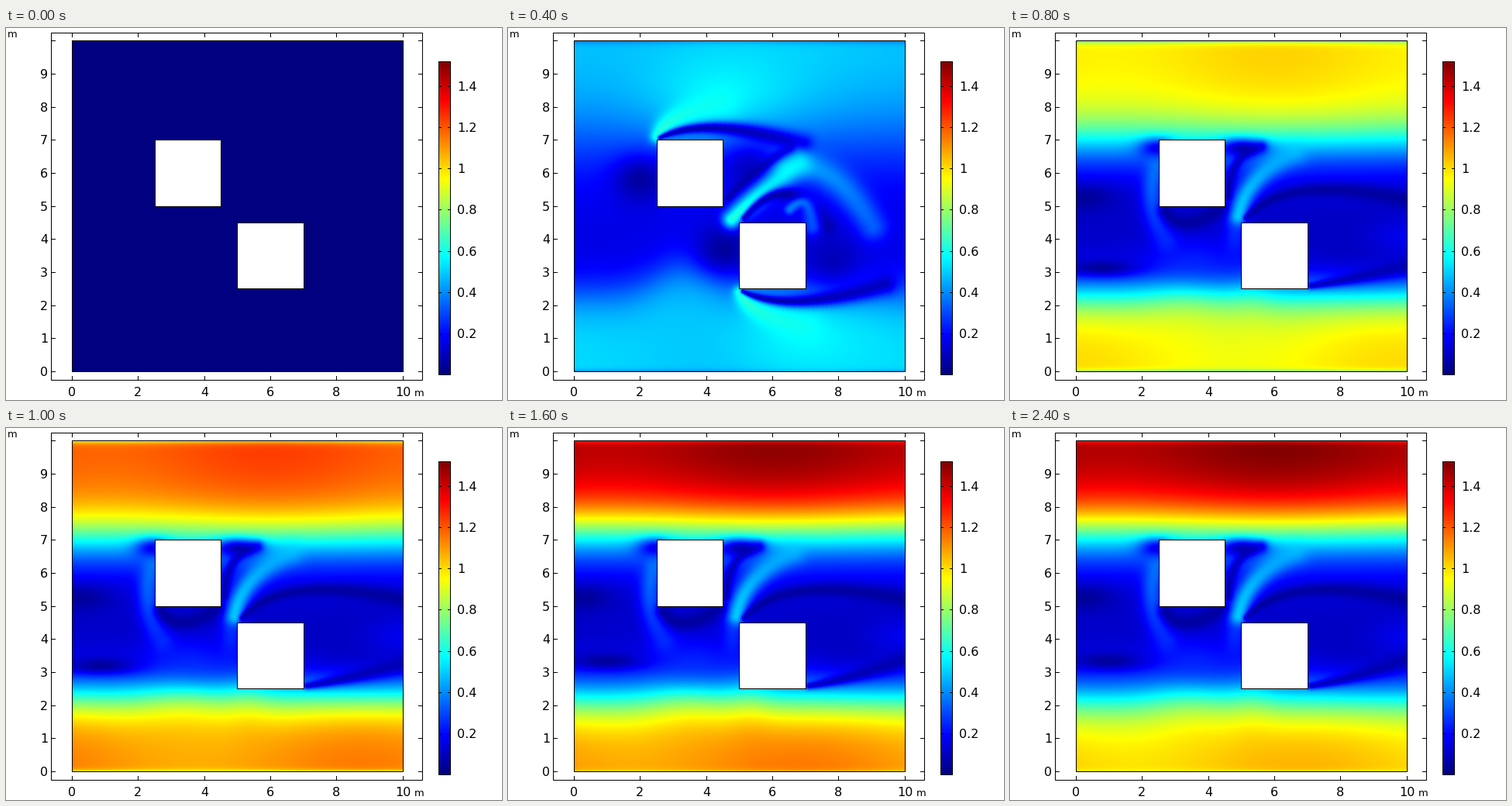
Recreate the animation shown at these times as a matplotlib script. Size 640 by 480 pixels, loop 2.5 s.

```python
import numpy as np
import matplotlib.pyplot as plt
from matplotlib.animation import FuncAnimation
from matplotlib.colors import LinearSegmentedColormap
from matplotlib.patches import Rectangle

W, H, DPI = 640, 480, 100
STEP, FRAMES = 100, 25
PX = 72 / DPI
VMAX = 1.52
GRID = 214

rainbow = LinearSegmentedColormap.from_list("rainbow", [
    (0, "#000080"), (0.125, "#0000ff"), (0.375, "#00ffff"),
    (0.625, "#ffff00"), (0.875, "#ff0000"), (1, "#800000")], N=1024)

cells = (np.arange(GRID) + 0.5) * 10 / GRID
X, Y = np.meshgrid(cells, cells[::-1])

# outer front corner of each block and the side it faces
CORNERS = [(2.5, 7, 1), (5, 2.5, -1)]


def ease(u):
    u = min(max(u, 0), 1)
    return u * u * (3 - 2 * u)


def softcap(v, top):
    return v / (1 + (v / top) ** 8) ** 0.125


def sigmoid(v):
    return 1 / (1 + np.exp(-v))


def hump(x, width):
    return np.exp(-((X - x) / width) ** 2)


def blob(f, x, y, rx, ry, v, s=1.0):
    """Pull the speed towards v inside a soft ellipse."""
    f += s * np.exp(-((X - x) / rx) ** 2 - ((Y - y) / ry) ** 2) * (v - f)


def stroke(f, path, w0, w1, v, s=1.0, fade=0.7):
    """Pull the speed towards v along a tapering quadratic curve."""
    p, q, r = np.reshape(path, (3, 2))
    near = np.full(f.shape, 99.0)
    for u in np.linspace(0, 1, 36):
        x, y = (1 - u) ** 2 * p + 2 * u * (1 - u) * q + u * u * r
        w = w0 + (w1 - w0) * u
        d = ((X - x) ** 2 + (Y - y) ** 2) / w ** 2 + fade * u * u
        np.minimum(near, d, out=near)
    f += s * np.exp(-near) * (v - f)


def streams(t, h, late):
    """Fast layers above and below a slow core."""
    core = softcap(1.25 * t, 0.14) - 0.04 * h
    top = softcap(1.25 * t, 1.5) * (1 + 0.025 * np.cos((X - 6) * np.pi / 5))
    low = softcap(1.25 * t, 1.19) - 0.11 * max(t - 1, 0)
    low = low * (1 + 0.035 * np.cos((X - 9.8 + 3 * late) * np.pi / 5))
    width = 0.5 + 0.3 * (1 - h) + 0.05 * late
    upper = sigmoid((Y - 6.95 - 0.4 * late) / width)
    edge = 2.35 - 0.12 * late + (0.8 - 0.6 * h) * hump(3.4, 1.3)
    lower = sigmoid((edge + 0.12 * hump(5.3, 0.7) - Y) / (0.4 + 0.05 * late))
    f = core + (top - core) * upper + (low - core) * lower
    wall = np.exp(-(10 - Y) / 0.07) + np.exp(-Y / 0.05)
    return f * (1 - 0.35 * (1 - 0.6 * late) * wall)


def separate(f, t, g, young):
    """Flow round each block while its wake forms."""
    fast = 1.25 * t
    for x, y, s in CORNERS:
        blob(f, x + 2, y + s * 1.5, 2.2, 1.2, 1.13 * fast, 0.9 * young)
        blob(f, x - 0.5, y - s * 1.2, 0.8, 0.7, 0.03, 0.9 * young)
        blob(f, x + 2.8, y - s * 0.9, 0.9, 0.8, 0.08, 0.9 * young)
        stroke(f, (x, y + s * 0.1, x + 0.3, y + s * (0.5 + 0.3 * g),
                   x + 1 + g, y + s * (0.7 + 0.3 * g)),
               0.2, 0.45 + 0.1 * g, (1.7 - 0.35 * g) * fast, 0.85 * young, 1)
        stroke(f, (x + 0.1, y + s * 0.07, x + 0.7 + 0.8 * g, y + s * (0.35 + 0.4 * g),
                   x + 2.2 + 2.2 * g, y + s * (0.05 - 0.2 * g)),
               0.07, 0.12 + 0.18 * g, 0.03, young, 0.3)


def settle(f, h, late):
    """Slow eddies left between the two streams."""
    drift = 0.2 * late
    blob(f, 0.3, 5.25, 0.9, 0.4, 0.04, h)
    blob(f, 0.8 + drift, 3.15 + drift, 1.1, 0.25, 0.04, h)
    blob(f, 2.45, 6.75, 0.55, 0.3, 0.08, 0.8 * h)
    blob(f, 8.4, 3.9, 1.8, 0.9, 0.09, 0.8 * h)
    blob(f, 10, 4.1, 1.2, 0.5, 0.19, 0.7 * h)
    blob(f, 3.6, 3.4, 1.2, 0.7, 0.26, 0.6 * h)
    blob(f, 4.8, 4.2, 0.35, 0.7, 0.3, 0.7 * h)
    stroke(f, (2.4, 6.2, 2.1, 5, 2.7, 4.0), 0.3, 0.4, 0.37, 0.9 * h)
    stroke(f, (2.7, 4.85, 3.2, 4.1, 4.4, 4.95), 0.22, 0.25, 0.05, h, 0)
    stroke(f, (7.1, 2.6, 8.3, 2.8, 10, 3.2 + drift), 0.1, 0.28, 0.05, 0.9 * h, 0.2)
    blob(f, 5, 6.75, 0.7, 0.28, 0.03, 0.9 * h)


def gap(f, g, h):
    """Jet between the blocks with the slow bands on both sides."""
    def morph(a, b, c):
        a, b, c = map(np.array, (a, b, c))
        return a + (b - a) * g + (c - b) * h

    roll = g * (1 - h)
    stroke(f, (6.4, 6.2, 7.8, 6.5, 9, 4.4), 0.45, 0.45, 0.42, roll, 0.4)
    stroke(f, morph((4.75, 4.7, 5.5, 5.35, 7.4, 5.35),
                    (4.75, 4.6, 5.7, 5.5, 6.8, 6.3),
                    (4.9, 4.7, 5.1, 5.9, 6.6, 6.6)),
           0.28, 0.38, 0.45 + 0.2 * g - 0.14 * h, 0.95, 0.5)
    stroke(f, morph((4.65, 5.25, 5.4, 5.75, 7, 5.95),
                    (4.65, 5.25, 5.3, 6, 6.5, 6.75),
                    (4.6, 5.3, 4.65, 6.6, 5.6, 6.8)),
           0.1, 0.17, 0.05, 0.9, 0.4)
    stroke(f, morph((5.1, 4.6, 5.9, 5, 7.1, 4.55),
                    (5.15, 4.65, 6.4, 6.2, 7.6, 4.4),
                    (5.15, 4.65, 6.3, 6, 10, 5.2)),
           0.1, 0.27, 0.04, 0.95, 0)
    stroke(f, (6.5, 4.9, 7.1, 5.5, 7.2, 4.4), 0.15, 0.28, 0.4, 0.9 * roll, 0.3)


def speed(t):
    ramp, t = min(t / 0.2, 1), max(t, 0.2)
    g = ease((t - 0.2) / 0.2)
    h = ease((t - 0.4) / 0.35)
    late = ease((t - 0.8) / 0.5)
    f = streams(t, h, late)
    if h < 1:
        separate(f, t, g, 1 - h)
    settle(f, h, late)
    gap(f, g, h)
    return ramp * f


fig = plt.figure(figsize=(W / DPI, H / DPI), dpi=DPI, facecolor="white")
ax = fig.add_axes([0, 0, 1, 1])
ax.axis("off")


def px(x):
    return int(256 / 3 + x * 128 / 3 + 0.01)


def py(y):
    return int(1330 / 3 - y * 128 / 3 + 0.01)


def show(data, extent, smooth):
    return ax.imshow(data, cmap=rainbow, vmin=0, vmax=VMAX, extent=extent,
                     aspect="auto", interpolation=smooth)


def box(x0, y0, x1, y1, fill="none"):
    ax.add_patch(Rectangle((x0 + 0.5, y0 + 0.5), x1 - x0, y1 - y0, fc=fill,
                           ec="black", lw=PX, snap=False, zorder=3))


def line(x0, y0, x1, y1):
    ax.plot([x0, x1], [y0, y1], color="black", lw=PX, snap=False,
            solid_capstyle="butt", zorder=4)


def label(x, y, s, ha="left", size=16):
    ax.text(x, y, s, ha=ha, va="baseline", fontsize=size * PX,
            family="DejaVu Sans", color="black")


field = show(speed(0), (85, 513, 444, 16), "bilinear")
show(np.linspace(VMAX, 0, 404)[:, None], (558, 574, 447, 43), "nearest")
ax.set_xlim(0, W)
ax.set_ylim(H, 0)

box(58, 6, 537, 454)
box(px(0), py(10), px(10), py(0))
for x, y, s in CORNERS:
    box(px(x), py(y), px(x + 2), py(y - 2 * s), "white")
box(558, 43, 573, 447)

for n in range(11):
    y = py(n)
    line(59, y + 0.5, 64, y + 0.5)
    line(532, y + 0.5, 537, y + 0.5)
    if n < 10:
        label(54, y + 6, str(n), "right")
    if n % 2 == 0:
        x = px(n)
        line(x + 0.5, 7, x + 0.5, 12)
        line(x + 0.5, 449, x + 0.5, 454)
        label(x, 475, str(n), "center")
for n in range(1, 8):
    y = int(447.5 - n * 0.2 * 404 / VMAX)
    line(559, y + 0.5, 562, y + 0.5)
    line(570, y + 0.5, 573, y + 0.5)
    label(582, y + 6, f"{n * 0.2:.2g}")
label(2, 12, "m", size=13)
label(527, 475, "m", size=13)


def update(i):
    field.set_data(speed(i * STEP / 1000))
    return [field]


anim = FuncAnimation(fig, update, frames=FRAMES, interval=STEP, repeat=True,
                     repeat_delay=0, blit=False)
plt.show()
```
